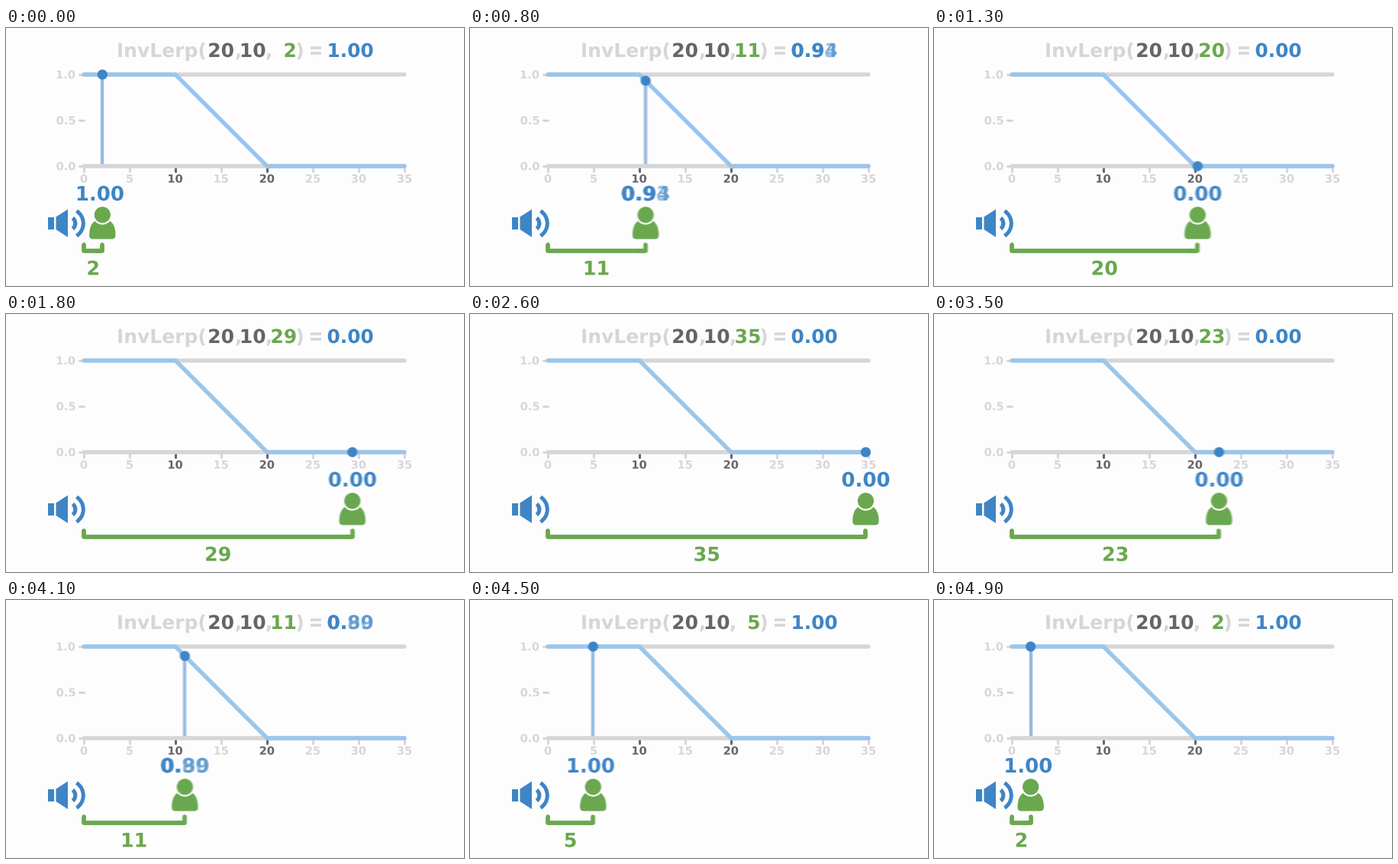
Animation of 600x338 px, one loop 5000 ms. Source, as a matplotlib script:

```python
import numpy as np
import matplotlib.pyplot as plt
from matplotlib.animation import FuncAnimation
from matplotlib.colors import to_rgb
from matplotlib.patches import Arc, Circle, PathPatch, Polygon, Rectangle
from matplotlib.path import Path
from matplotlib.textpath import TextPath

W, H, DPI = 600, 338, 100
LOOP, STEP = 5000, 100
PHASE, SHUTTER = 40, 14            # ms
BG, PALE, DARK = "#fefdfe", "#d7d5d8", "#666468"
BLUE, SKY, DROP, GREEN = "#3d85c6", "#9ac6ec", "#96bbe2", "#6aa84f"
X0, UNIT, TOP, BASE = 102, 12, 61, 181
NEAR, FAR = 10, 20
FONT = {"family": "DejaVu Sans", "weight": "bold"}

fig = plt.figure(figsize=(W / DPI, H / DPI), dpi=DPI, facecolor=BG)
ax = fig.add_axes([0, 0, 1, 1])
ax.set_xlim(0, W)
ax.set_ylim(H, 0)
ax.axis("off")

motion = {"smear": 0.0}


def px(value):
    return X0 + UNIT * value


def distance(ms):
    u = (ms % LOOP) / (LOOP / 2)
    u = min(u, 2 - u)
    return 2 + 33 * u * u * (3 - 2 * u)


def falloff(value):
    return min(1.0, max(0.0, (FAR - value) / (FAR - NEAR)))


def glyphs(text, x, y, size, align="center"):
    outline = TextPath((0, 0), text, size=size, prop=FONT)
    points = outline.vertices * [1, -1]
    if align == "center":
        box = outline.get_extents()
        x -= (box.x0 + box.x1) / 2
    return Path(points + [x, y], outline.codes)


def smeared(artist, color):
    """Blur a single-colour artist horizontally over the shutter time."""
    def smear(image, dpi):
        length = max(1.0, motion["smear"] * dpi / DPI)
        pad = int(np.ceil(length / 2)) + 1
        taps = np.arange(-pad, pad + 1)
        weights = np.clip((length + 1) / 2 - abs(taps), 0, 1)
        weights /= weights.sum()
        h, w = image.shape[:2]
        out = np.zeros((h, w + 2 * pad, 4))
        out[..., :3] = to_rgb(color)
        for tap, weight in zip(taps, weights):
            out[:, pad + tap:pad + tap + w, 3] += weight * image[..., 3]
        return np.clip(out, 0, 1), -pad, 0

    artist.set_agg_filter(smear)
    return artist


def line(xs, ys, color, width, z, cap="round"):
    return ax.plot(xs, ys, color=color, lw=width * 0.72, zorder=z,
                   solid_capstyle=cap, solid_joinstyle="round")[0]


def fill(path, color, z):
    return ax.add_patch(PathPatch(path, fc=color, ec="none", lw=0, zorder=z))


def write(text, x, y, size, color, align="center"):
    return fill(glyphs(text, x, y, size, align), color, 8)


class Readout:
    """A number whose changing digits cross-blend between two samples."""

    def __init__(self, size, y, blurred=False):
        self.size, self.y = size, y
        self.parts = [fill(Path([(0, 0)]), BLUE, 8 + i) for i in range(3)]
        if blurred:
            for part in self.parts:
                smeared(part, BLUE)

    def show(self, a, b, x):
        common = 0
        while common < len(a) and a[common] == b[common]:
            common += 1
        same = a == b
        layers = [(a, 1 if same else 0.62), ("" if same else b, 0.5),
                  ("" if same else a[:common], 1)]
        for part, (text, alpha) in zip(self.parts, layers):
            part.set_visible(bool(text))
            if text:
                part.set_path(glyphs(text, x, self.y, self.size, "left"))
                part.set_alpha(alpha)


# Graph
for y in (TOP, BASE):
    line([X0, px(35)], [y, y], PALE, 5.5, 1)
for text, y in (("1.0", TOP), ("0.5", (TOP + BASE) / 2), ("0.0", BASE)):
    line([95.5, X0], [y, y], PALE, 3, 1)
    write(text, 78.5, y + 5.2, 14.6, PALE)
for value in range(0, 36, 5):
    color = DARK if value in (NEAR, FAR) else PALE
    line([px(value)] * 2, [BASE, BASE + 7], color, 3, 0.8)
    write(str(value), px(value), 202.5, 14.6, color)
line([X0, px(NEAR), px(FAR), px(35)], [TOP, TOP, BASE, BASE], SKY, 5.5, 4)

# Title
write("InvLerp(", 204, 38, 25, PALE)
for text, x, color in (("20", 282, DARK), (",", 304, PALE), ("10", 324, DARK),
                       (",", 344, PALE), (")", 385, PALE)):
    write(text, x, 38, 25, color)
for y in (25.8, 32.6):
    line([399, 413], [y, y], PALE, 3.6, 8, "butt")

# Speaker
ax.add_patch(Rectangle((55, 247.5), 7.5, 16.5, fc=BLUE, ec="none"))
ax.add_patch(Polygon([(65.5, 247.5), (81, 237.5), (81, 274), (65.5, 264)],
                     fc=BLUE, ec="none"))
for radius, width, spread in ((9, 5.2, 52), (19.5, 5, 57)):
    ax.add_patch(Arc((81.8, 256), 2 * radius, 2 * radius, theta1=-spread,
                     theta2=spread, color=BLUE, lw=width * 0.72))

# Moving parts
drop = smeared(line([0, 0], [0, 0], DROP, 4.4, 0.6, "butt"), DROP)
dot = smeared(ax.add_patch(Circle((0, 0), 6.6, fc=BLUE, ec="none", zorder=6)), BLUE)
bracket = line([0, 0], [0, 0], GREEN, 5.8, 3)
bracket_end = smeared(line([0, 0], [0, 0], GREEN, 5.8, 3), GREEN)

BODY = np.array([(-17.2, 271.5), (-17.2, 261), (-14, 254), (-7, 251.5), (7, 251.5),
                 (14, 254), (17.2, 261), (17.2, 271.5), (17.2, 276.5), (12.5, 276.5),
                 (-12.5, 276.5), (-17.2, 276.5), (-17.2, 271.5)])
BODY_CODES = [1, 4, 4, 4, 2, 4, 4, 4, 3, 3, 2, 3, 3]
body = smeared(fill(Path(BODY, BODY_CODES), GREEN, 5), GREEN)
gap, head = (
    smeared(ax.add_patch(Circle((0, 244.8), r, fc=c, ec="none", zorder=z)), c)
    for r, c, z in ((12.8, BG, 6), (10.6, GREEN, 7)))

span = write("0", 0, 0, 25, GREEN)
argument = write("0", 0, 0, 25, GREEN)
result = Readout(24.8, 38)
label = Readout(26, 226, blurred=True)


def update(i):
    ms = i * STEP + PHASE
    value = distance(ms)
    before, after = (distance(ms + s * SHUTTER / 4) for s in (-1, 1))
    motion["smear"] = 2 * UNIT * abs(after - before)
    x = px(value)
    y = BASE - (BASE - TOP) * falloff(value)

    drop.set_data([x, x], [y, BASE])
    dot.center = (x, y)
    bracket.set_data([X0, X0, x - 5], [283.8, 292.3, 292.3])
    bracket_end.set_data([x - 9, x, x], [292.3, 292.3, 283.8])
    body.set_path(Path(BODY + [x, 0], BODY_CODES))
    gap.center = head.center = (x, 244.8)

    whole = f"{value:.0f}"
    span.set_path(glyphs(whole, (X0 + x) / 2, 323.5, 25.4))
    argument.set_path(glyphs(whole, 364 if len(whole) > 1 else 372, 38, 25))
    a, b = (f"{falloff(v):.2f}" for v in (before, after))
    result.show(a, b, 420.5)
    label.show(a, b, x - (35.5 if a == b == "1.00" else 32))
    return []


anim = FuncAnimation(fig, update, frames=LOOP // STEP, interval=STEP,
                     init_func=lambda: [], repeat=True, repeat_delay=0)
plt.show()
```
